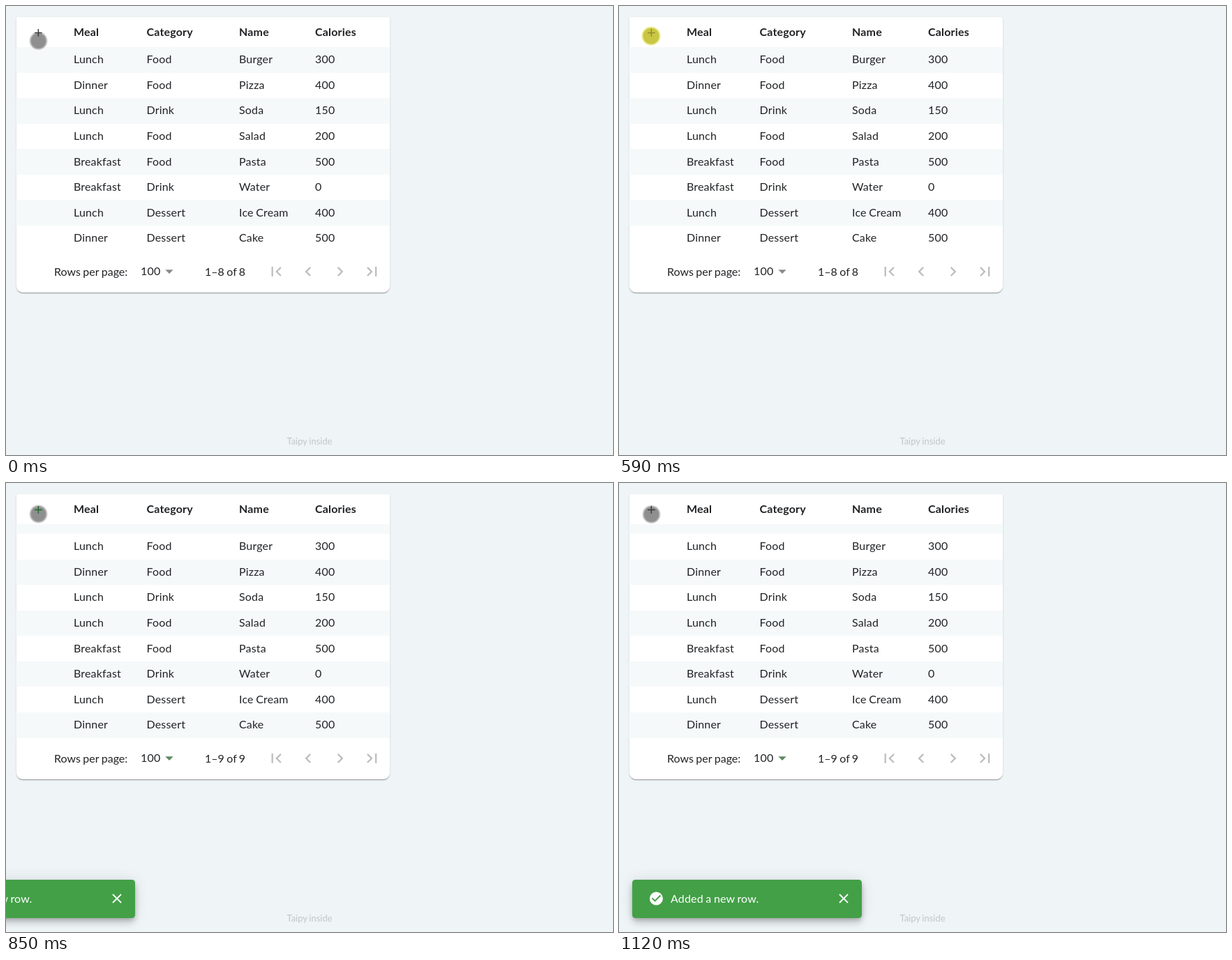
An HTML page for the animation above (2.54 s loop, 870 by 644 pixels).

```html
<!DOCTYPE html>
<html lang="en">
<head>
<meta charset="utf-8">
<title>Adding a table row</title>
<style>
  html, body { margin: 0; width: 100%; height: 100%; overflow: hidden; background: #eff4f7; }
  text { font: 16px Lato, sans-serif; letter-spacing: .17px; word-spacing: -.8px; fill: #212326; }
  svg { position: absolute; left: 0; top: 0; overflow: visible; }
  .head text { font-weight: 700; }
  .muted { fill: #bdbdbd; }
  .tight { letter-spacing: .03px; }
  .credit { font-size: 13px; letter-spacing: 0; fill: #c1c6c9; }

  .card, .toast, .stage * { animation: 2540ms step-end infinite; }

  .card {
    position: absolute; left: 14.5px; top: 16px; width: 535px; height: 395px;
    border-radius: 2px 2px 9px 9px; background: #fff; animation-name: card;
    box-shadow: 0 2px 1px -1px rgba(0,0,0,.2), 0 1px 1px rgba(0,0,0,.14), 0 1px 3px rgba(0,0,0,.12);
  }
  @keyframes card {
    31.1% { height: 390.5px; }
    33.46%, 100% { height: 409px; }
  }

  .stage .before { animation-name: before; }
  .stage .after { animation-name: after; }
  .stage .shift { animation-name: shift; }
  .stage .footer { animation-name: footer; }
  .stage .loading { animation-name: loading; }
  .stage .arrow { fill: #8a8a8a; animation-name: arrow; }
  @keyframes before { 0% { visibility: visible; } 33.46%, 100% { visibility: hidden; } }
  @keyframes after { 0% { visibility: hidden; } 33.46%, 100% { visibility: visible; } }
  @keyframes shift { 33.46%, 100% { transform: translateY(14px); } }
  @keyframes footer { 31.1% { opacity: 0; } 33.46%, 100% { opacity: 1; } }
  @keyframes loading { 0% { opacity: 0; } 31.1% { opacity: 1; } 33.46%, 100% { opacity: 0; } }
  @keyframes arrow { 33.46%, 100% { fill: #5f8a60; } }

  .stage .pointer { animation-name: pointer; }
  .stage .halo { fill: #bebebe; animation-name: halo; }
  .stage .disc { fill: #8f8f8f; animation-name: disc; }
  .stage .plus { fill: #3c3c40; animation-name: plus; }
  @keyframes pointer {
    0% { transform: translate(46.5px, 50px); }
    7.87% { transform: translate(46.5px, 48px); }
    10.62% { transform: translate(46.5px, 45px); }
    12.99% { transform: translate(46.5px, 43.5px); }
    23.22% { transform: translate(46px, 43px); }
    28.34% { transform: translate(46.5px, 43.5px); }
    33.46% { transform: translate(46.5px, 44.5px); }
    36.21%, 100% { transform: translate(46.5px, 45px); }
  }
  @keyframes halo { 23.22% { fill: #ebeb94; r: 13.5px; } 28.34% { fill: #bebebe; r: 12.7px; } }
  @keyframes disc { 23.22% { fill: #c9c742; r: 11.6px; } 28.34% { fill: #8f8f8f; r: 10.8px; } }
  @keyframes plus { 23.22% { fill: #8f8d35; } 28.34% { fill: #3c3c40; } 33.46% { fill: #1f6a2c; } 36.21% { fill: #3c3c40; } }

  .toast {
    position: absolute; left: 19px; top: 569px; width: 329px; height: 55px;
    border-radius: 4.5px; background: #43a047; animation-name: toast;
    box-shadow: 0 3px 6px -1px rgba(0,0,0,.2), 0 7px 11px rgba(0,0,0,.14), 0 1px 20px rgba(0,0,0,.12);
  }
  .toast text, .toast path { fill: #fff; }
  @keyframes toast {
    0% { transform: translateX(-400px); }
    33.46% { transform: translateX(-163px); }
    36.21% { transform: translateX(-51.5px); }
    38.97% { transform: translateX(-5px); }
    41.33%, 100% { transform: none; }
  }
</style>
</head>
<body>
<div class="card"></div>

<svg class="stage" width="870" height="644">
  <g id="stripes" fill="#f5f9fa"></g>
  <g id="head" class="head"></g>
  <g id="rows" class="shift"></g>

  <g class="shift"><g class="footer">
    <text class="tight" x="69" y="387">Rows per page:</text>
    <text x="193" y="386">100</text>
    <path class="arrow" d="M228.3 378.3h11.4l-5.7 5.7z"/>
    <text class="tight before" x="285" y="387">1–8 of 8</text>
    <text class="tight after" x="285" y="387">1–9 of 9</text>
    <g id="pager" class="muted"></g>
  </g></g>

  <g class="loading">
    <rect x="14.5" y="364" width="75" height="32.5" rx="9" fill="#e2e2e2"/>
    <path d="M842 605.2A8.7 8.7 0 1 0 854.7 613.5" fill="none" stroke="#ee8072" stroke-width="2"/>
  </g>

  <g class="pointer">
    <circle class="halo" r="12.7"/>
    <circle class="disc" r="10.8"/>
  </g>
  <path class="plus" d="M41 37.7h4.6v-4.6h1.5v4.6h4.6v1.5h-4.6v4.6h-1.5v-4.6H41z"/>

  <text class="credit" x="435" y="629" text-anchor="middle">Taipy inside</text>
</svg>

<div class="toast">
  <svg width="329" height="55">
    <path transform="translate(23 15.6) scale(.952)" d="M12 2a10 10 0 1 0 0 20a10 10 0 1 0 0-20zM10 17l-5-5 1.41-1.41L10 14.17l7.59-7.59L19 8z" fill-rule="evenodd"/>
    <text x="55" y="33">Added a new row.</text>
    <path transform="translate(291.6 15.6) scale(.952)" d="M19 6.41L17.59 5 12 10.59 6.41 5 5 6.41 10.59 12 5 17.59 6.41 19 12 13.41 17.59 19 19 17.59 13.41 12z"/>
  </svg>
</div>

<script>
  const columns = [97, 201.5, 334, 443];
  const meals = [
    "Lunch,Food,Burger,300", "Dinner,Food,Pizza,400", "Lunch,Drink,Soda,150", "Lunch,Food,Salad,200",
    "Breakfast,Food,Pasta,500", "Breakfast,Drink,Water,0", "Lunch,Dessert,Ice Cream,400", "Dinner,Dessert,Cake,500"
  ];
  const pitch = 36.57;
  const fill = (id, html) => document.getElementById(id).innerHTML = html;
  const line = (row, y) => row.split(",").map((cell, i) => `<text x="${columns[i]}" y="${y}">${cell}</text>`).join("");
  const stripe = (state, top, bottom) =>
    `<rect class="${state}" x="14.5" y="${top}" width="535" height="${bottom - top}"/>`;
  const band = (state, start, i) =>
    stripe(state, Math.round(start + i * pitch), Math.round(start + (i + 1) * pitch));

  fill("head", line("Meal,Category,Name,Calories", 43));
  fill("rows", meals.map((row, i) => line(row, Math.round(82.3 + i * pitch))).join(""));
  fill("stripes", stripe("after", 59, 73) +
    meals.map((_, i) => i % 2 ? band("after", 73, i) : band("before", 59, i)).join(""));

  // Pager icons on a 24-unit grid
  const icons = [
    "M18.41 16.59L13.82 12l4.59-4.59L17 6l-6 6 6 6zM6 6h2v12H6z",
    "M15.41 7.41L14 6l-6 6 6 6 1.41-1.41L10.83 12z",
    "M10 6L8.59 7.41 13.17 12l-4.58 4.59L10 18l6-6z",
    "M5.59 7.41L10.18 12l-4.59 4.59L7 18l6-6-6-6zM16 6h2v12h-2z"
  ];
  fill("pager", icons.map((d, i) =>
    `<path transform="translate(${373.7 + i * 45.7} 367.2) scale(1.143)" d="${d}"/>`).join(""));
</script>
</body>
</html>
```
